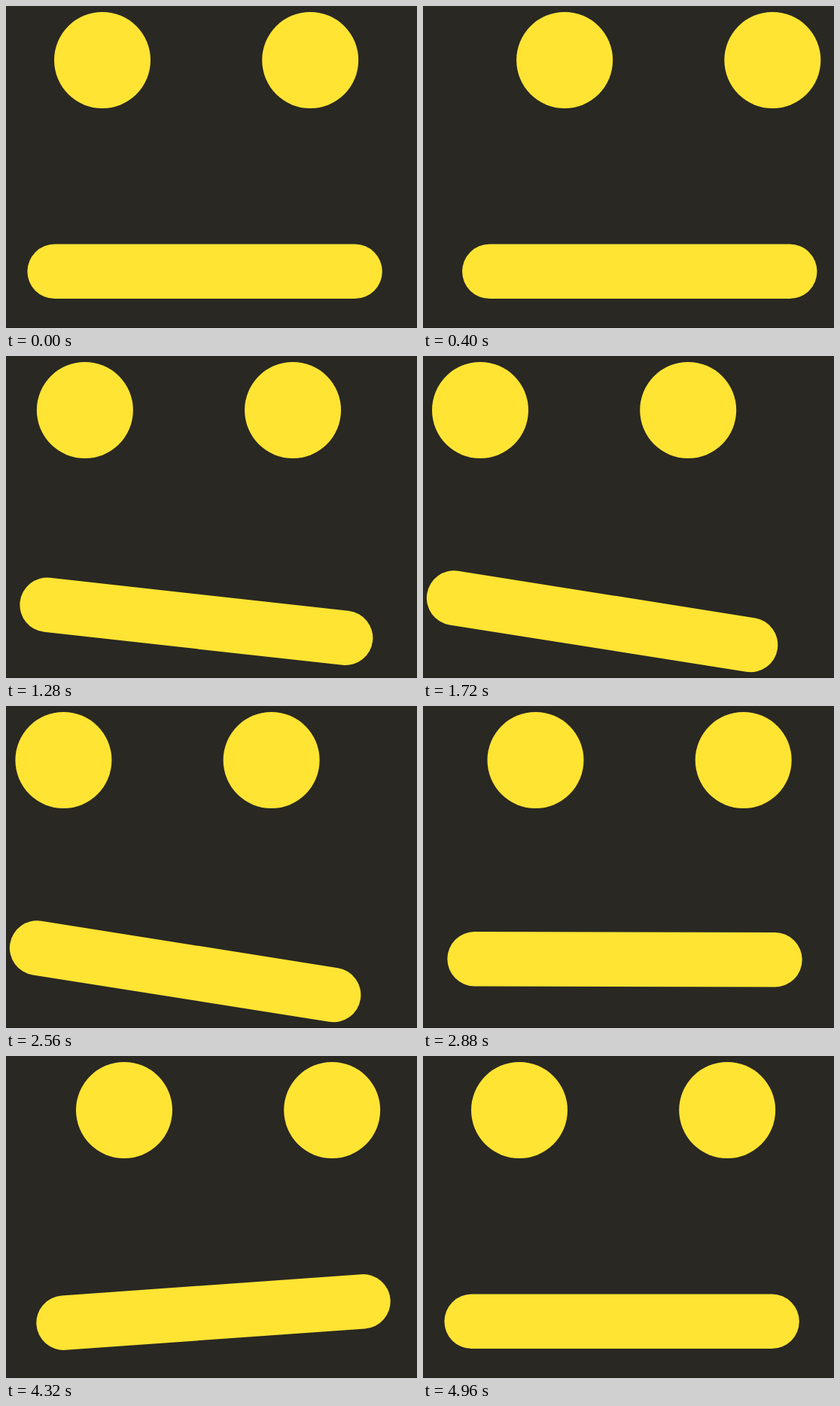
Write an HTML page that moves like this. It is 546 px wide and 428 px high and loops after 5400 ms.

```html
<!DOCTYPE html>
<html lang="en">
<head>
<meta charset="utf-8">
<title>Glancing face</title>
<style>
  html, body { margin: 0; width: 100%; height: 100%; overflow: hidden; background: #292823; }
  svg { display: block; width: 546px; height: 428px; }
</style>
</head>
<body>
<svg viewBox="0 0 546 428" fill="#ffe433">
  <rect width="546" height="428" fill="#292823"/>
  <rect y="427" width="546" height="1" fill="#231f20"/>
  <ellipse id="leftEye" cy="72" rx="64" ry="64"/>
  <ellipse id="rightEye" cy="72" rx="64" ry="64"/>
  <rect id="mouth" x="-235.7" y="-36.25" width="471.4" height="72.5" rx="36.25"/>
</svg>
<script>
const LOOP = 5400, STEP = 40, EYE_RADIUS = 64, EYE_GAP = 276.2;
const [leftEye, rightEye, mouth] =
  ['leftEye', 'rightEye', 'mouth'].map(id => document.getElementById(id));

const clamp = v => Math.min(1, Math.max(0, v));
const mix = (a, b, p) => a + (b - a) * p;
const smooth = s => s * s * (3 - 2 * s);

// Cubic bezier easing with control points (x1, 0) and (x2, 1).
function ease(x1, x2, x) {
  let low = 0, high = 1;
  for (let i = 0; i < 24; i++) {
    const s = (low + high) / 2, r = 1 - s;
    if (3 * r * r * s * x1 + 3 * r * s * s * x2 + s ** 3 < x) low = s;
    else high = s;
  }
  return smooth(low);
}

const front = { eye: 128, x: 264.1, y: 352.8, angle: 0 };
const right = { eye: 193.3, x: 289.8, y: 352.8, angle: 0 };
const left = { eye: 76, x: 238.1, y: 352.8, angle: 9 };
const cheeky = { eye: 193.3, x: 289.8, y: 325, angle: -7 };

// The mouth and its tilt may trail the eyes a little.
const moves = [
  { from: front, to: right, start: 0, time: 600, curve: [.4, .2] },
  { from: right, to: left, start: 955, time: 740, curve: [.4, .1], lag: 20, tiltLag: 25 },
  { from: left, to: cheeky, start: 2526, time: 871, curve: [.4, .2], lag: 20, tiltLag: 30 },
  { from: cheeky, to: front, start: 4075, time: 870, curve: [.25, .1], tiltCurve: [.35, .15] }
];

function poseAt(t) {
  const move = moves.filter(m => t >= m.start).pop();
  const { from, to, start, time, curve, lag = 0, tiltLag = 0, tiltCurve = curve } = move;
  const progress = (delay, c) => ease(...c, clamp((t - start - delay) / time));
  const body = progress(lag, curve);
  return {
    eye: mix(from.eye, to.eye, progress(0, curve)),
    x: mix(from.x, to.x, body),
    y: mix(from.y, to.y, body),
    angle: mix(from.angle, to.angle, progress(tiltLag, tiltCurve))
  };
}

function winkAt(t) {
  const half = 187.5, middle = 3332.5;
  return smooth(clamp(1 - Math.abs(t - middle) / half));
}

function draw(t) {
  const pose = poseAt(t);
  leftEye.setAttribute('cx', pose.eye);
  rightEye.setAttribute('cx', pose.eye + EYE_GAP);
  rightEye.setAttribute('ry', mix(EYE_RADIUS, 3, winkAt(t)));
  mouth.setAttribute('transform', `translate(${pose.x} ${pose.y}) rotate(${pose.angle})`);
}

const begin = performance.now();
function tick() {
  const t = (performance.now() - begin) % LOOP;
  draw(Math.floor(t / STEP) * STEP);
  requestAnimationFrame(tick);
}
tick();
</script>
</body>
</html>
```
